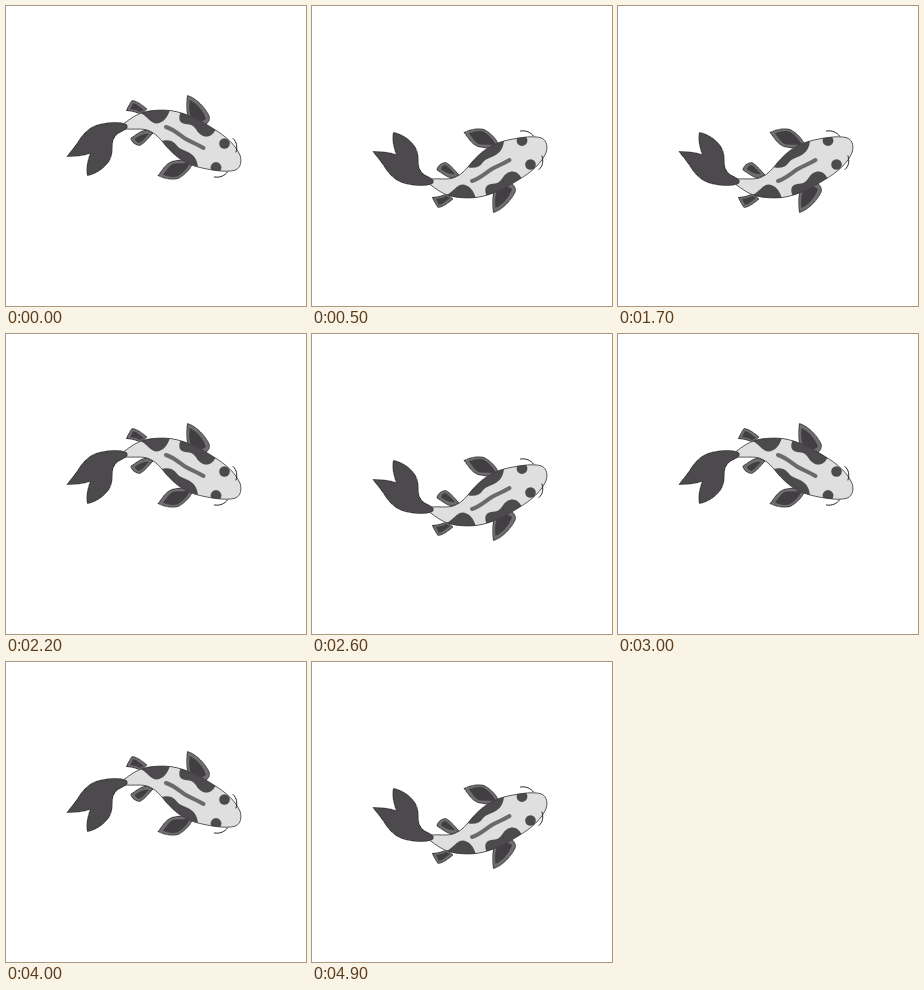
These frames come from a looping animation (300 px wide and 300 px high, 5 s). An HTML page:

```html
<!DOCTYPE html>
<html lang="en">
<head>
<meta charset="utf-8">
<title>Koi</title>
<style>
  html, body { margin: 0; width: 100%; height: 100%; overflow: hidden; background: #fff; }
  svg { display: block; width: 100vw; height: 100vh; }
  .edge { stroke: #343234; stroke-width: .8; stroke-linejoin: round; shape-rendering: crispEdges; }
  .dark { fill: #4c4a4c; }
  .fin { fill: #706e70; }
  .core { fill: #413f41; }
  .line { fill: none; stroke-linecap: round; }
</style>
</head>
<body>
<svg viewBox="0 0 300 300">
  <defs>
    <path id="body" d="M118 117.500C124 113 130 108.500 137 106.300C146 104 156 103.600 165 104.600C181 107 195 115 207 122.500C219 129.500 230 139 234.300 150C236 157 234 163 228 164.500C219 166.500 204 164 192 161C177 157 168 149 160 140C153 131 147 125 139 123.500C133 122.500 127 123.500 119 123Z"/>
    <clipPath id="skin"><use href="#body"/></clipPath>
  </defs>
  <g id="koi">
    <g class="edge">
      <path class="fin" d="M181.500 89.500C190 92 200 102 203.500 111C203.500 115 202 117 199 119L183 113C180 106 180.500 97 181.500 89.500Z"/>
      <path class="fin" d="M152 169.500C156 165 159 158 166 155.500C173 153.500 181 154 188 153.500C186 162 179 169 172 172.500C165 174 158 172.500 152 169.500Z"/>
      <path class="fin" d="M126 94.500C131 95 136 99 141 103L135 108C130 106 126 105 120.500 104.500C122 101 123.500 98 126 94.500Z"/>
      <path class="fin" d="M125 132C130 129 134 125 140 124L147 127C143 131 140 136 134 139.500C130 139.500 125 136 125 132Z"/>
    </g>
    <g class="core">
      <path d="M183.500 94C191 97 198 106 200 113L195 116L185 111C182.500 105 183 99 183.500 94Z"/>
      <path d="M157 168.500C161 164 163 159 168 157.500L184 157C181 163 176 168 171 170.500C166 171.500 161 170.500 157 168.500Z"/>
      <path d="M127 97C131 98 134 101 138 104L134 106C131 104 127 103.500 124 103C125 101 126 99 127 97Z"/>
      <path d="M129 132.500C134 130 137 127 143 128C140 131 138 134 133.500 137C131 136.500 129 135 129 132.500Z"/>
    </g>
    <use href="#body" fill="#e0dfe0"/>
    <g class="dark" clip-path="url(#skin)">
      <path d="M134 102H164.500C162 111 158 116.500 151 117.500C144 117.500 142 110 134 107Z"/>
      <path d="M176 104C172 110 172 117 179 118C185 118.500 187 119 190.500 124C195 131.500 204 134 209.500 124L207 117Z"/>
      <path d="M150 137C158 133 166 133 170 138.500C173 143 177 143.500 182 146C188 149 192 154 192 163H165Z"/>
      <circle cx="218.500" cy="137.500" r="5.300"/>
      <circle cx="210" cy="161.500" r="5.400"/>
    </g>
    <use href="#body" class="edge" fill="none"/>
    <path class="line" stroke="#6b696b" stroke-width="4" d="M160 121C168 123.500 173 128.500 179 132.500C185 136 191 138 197.500 142"/>
    <path class="dark edge" d="M121 119C116 116 107 116 99 117.500C87 119 80 124 74 133C70 140 65 145 61 150.500C70 150 77 150 84.500 147C82 154 80 162 81.500 169.500C89 168 98 163 103 155C109 145 103 136 110 129C113 126 119 124.500 121 122Z"/>
    <path class="line" stroke="#242224" stroke-width="1" d="M227 132.500C231 136 231.500 141 230 146M208.500 171C214 172 219 169.500 221.500 166"/>
  </g>
</svg>
<script>
  const LOOP = 5000, BEAT = 500, AXIS = 148;
  const koi = document.getElementById("koi");

  // The koi snaps to its mirror image on every beat.
  function draw(ms) {
    const flipped = Math.floor((ms % LOOP) / BEAT) % 2;
    koi.setAttribute("transform", flipped ? `matrix(1 0 0 -1 0 ${2 * AXIS})` : "");
  }

  const start = performance.now();
  function tick() {
    draw(performance.now() - start);
    requestAnimationFrame(tick);
  }
  tick();
</script>
</body>
</html>
```
